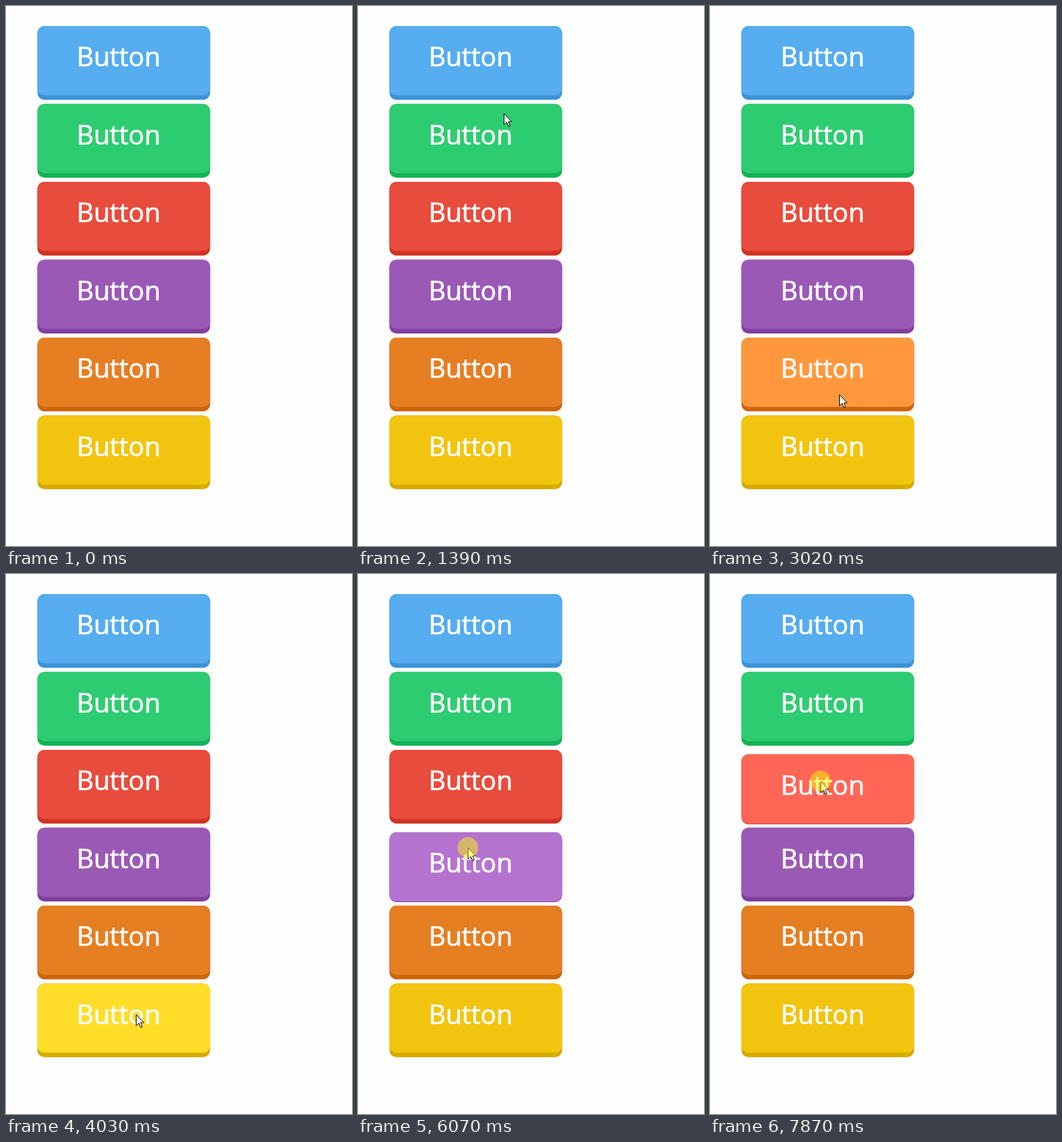
Write an HTML page with a canvas that moves like this. It is 501x780 px and loops after 8000 ms.

```html
<!DOCTYPE html>
<html lang="en">
<head>
<meta charset="utf-8">
<title>Flat buttons</title>
<style>
html, body { margin: 0; width: 100%; height: 100%; overflow: hidden; background: #fefefe; }
canvas { display: block; }
</style>
</head>
<body>
<canvas id="stage" width="501" height="780"></canvas>
<script>
const ctx = document.getElementById('stage').getContext('2d');
const LOOP = 8000, TICK = 77.3, START = 70;
const LEFT = 45.5, TOP = 29, WIDTH = 250, FACE = 100, PITCH = 112.5, DEPTH = 6.5, RADIUS = 10;
const PAPER = '#fefefe';
const colors = ['#55acee', '#2ecc71', '#e74c3c', '#9b59b6', '#e67e22', '#f1c40f'];

// pointer legs, resting in between; power 2 eases out
const entry = { x: 393, y: 775 };
const legs = [
  { from: START, to: 1100, x: 217, y: 119, power: 2 },
  { from: 1240, to: 2080, x: 183, y: 330, power: 1 },
  { from: 2080, to: 3310, x: 188, y: 636, power: 1 },
  { from: 4650, to: 5000, x: 158, y: 539, power: 2 },
  { from: 5540, to: 6020, x: 159, y: 395, power: 2 },
  { from: 6660, to: 7060, x: 160, y: 299, power: 2 }
];

// the halo shows from touch to release, the button is down from press to release
const clicks = [
  { touch: 3630, press: 4030, release: 4030 },
  { touch: 4190, press: 4350, release: 4730 },
  { touch: 5130, press: 5130, release: 5590 },
  { touch: 6070, press: 6070, release: 6700 },
  { touch: 7550, press: 7870, release: LOOP }
];

function shade(hex, amount) {
  const rgb = hex.match(/\w\w/g).map(c => parseInt(c, 16) + amount);
  return `rgb(${rgb.map(c => Math.min(255, Math.max(0, c)))})`;
}

function pointerAt(t) {
  let { x, y } = entry;
  for (const leg of legs) {
    const u = Math.min(1, Math.max(0, (t - leg.from) / (leg.to - leg.from)));
    const k = 1 - (1 - u) ** leg.power;
    x += (leg.x - x) * k;
    y += (leg.y - y) * k;
  }
  return { x: Math.round(x), y: Math.round(y) };
}

function hoveredAt(t) {
  const { x, y } = pointerAt(t);
  const i = Math.floor((y - TOP) / PITCH);
  const inside = x >= LEFT && x < LEFT + WIDTH && y - TOP - i * PITCH < FACE + DEPTH;
  return inside ? i : -1;
}

function slab(y, height, color) {
  ctx.fillStyle = color;
  ctx.beginPath();
  ctx.roundRect(LEFT, y, WIDTH, height, RADIUS);
  ctx.fill();
}

function drawButton(i, hover, pressed) {
  const y = TOP + i * PITCH + (pressed ? DEPTH : 0);
  slab(y, FACE + (pressed ? 1 : DEPTH), shade(colors[i], -25));
  slab(y, FACE, shade(colors[i], hover ? 26 : 0));
  ctx.fillStyle = ctx.strokeStyle = '#fff';
  ctx.lineWidth = 0.7;
  ctx.fillText('Button', 163, y + 58);
  ctx.strokeText('Button', 163, y + 58);
}

const arrow = new Path2D('M.5 .5V16.5L4.3 12.9L7 19L9.4 18L6.8 12H11.5Z');

function drawPointer({ x, y }, halo) {
  ctx.save();
  ctx.translate(x, y);
  ctx.fillStyle = '#fff';
  ctx.strokeStyle = '#000';
  ctx.lineWidth = 1;
  ctx.fill(arrow);
  ctx.stroke(arrow);
  if (halo) {
    ctx.fillStyle = 'rgba(255, 255, 0, .47)';
    ctx.beginPath();
    ctx.arc(0, 0, 15, 0, Math.PI * 2);
    ctx.fill();
  }
  ctx.restore();
}

function draw(t) {
  const step = START + Math.floor((t - START) / TICK) * TICK;
  const click = clicks.find(c => t >= c.touch && t < c.release);
  const hover = hoveredAt(step - TICK);
  const down = click && t >= click.press;
  ctx.fillStyle = PAPER;
  ctx.fillRect(0, 0, 501, 780);
  ctx.font = '38.2px "Open Sans", "Noto Sans", sans-serif';
  ctx.textAlign = 'center';
  colors.forEach((_, i) => drawButton(i, i === hover, down && i === hover));
  if (t >= START) drawPointer(pointerAt(step), click);
}

const begin = performance.now();
function frame() {
  draw((performance.now() - begin) % LOOP);
  requestAnimationFrame(frame);
}
frame();
</script>
</body>
</html>
```
